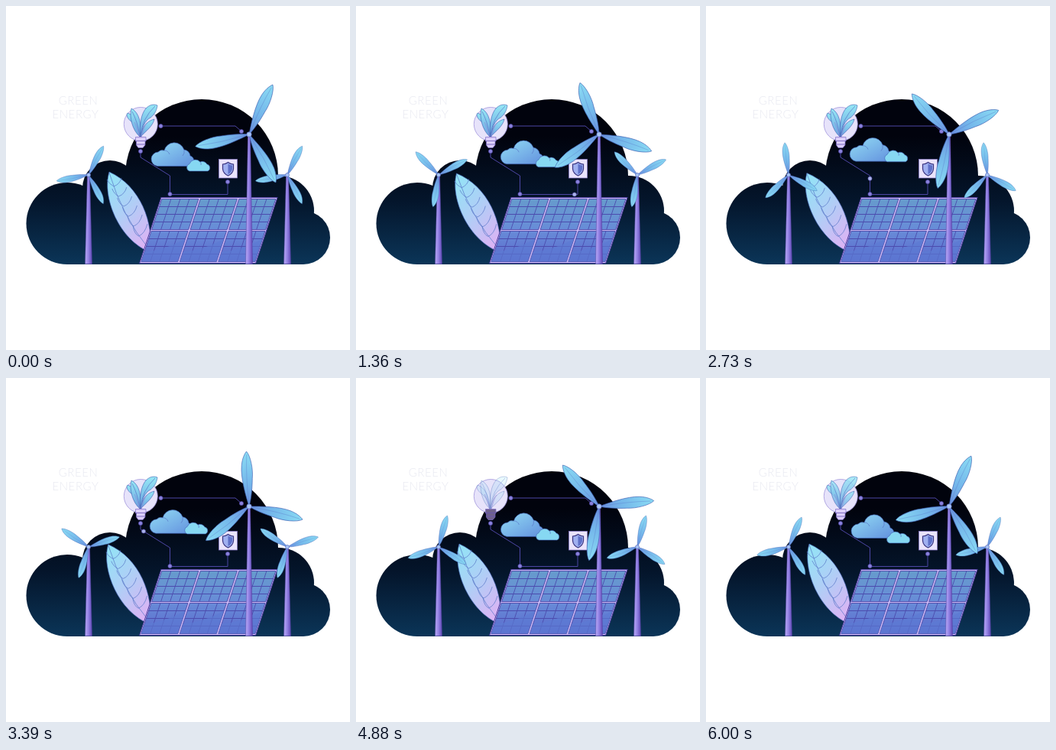
An HTML page for the animation above (6.03 s loop, 450 by 450 pixels).

```html
<!DOCTYPE html>
<html lang="en">
<head>
<meta charset="utf-8">
<title>Green energy</title>
<style>
  html, body { margin: 0; width: 100%; height: 100%; overflow: hidden; background: #fff; }
  svg { display: block; width: 100vw; height: 100vh; }
  text { font: 300 15px Lato, "Open Sans", sans-serif; letter-spacing: .6px; text-anchor: end; fill: #e8e9f1; }
  .wire { fill: none; stroke: #4d46a4; stroke-width: 1; }
  .dot { fill: #8a82dc; stroke: #4a40a0; stroke-width: .6; }
  .edge { stroke: #3c5cb0; stroke-width: .6; }
  .vein { fill: none; stroke: #5a78c8; stroke-width: .7; }
</style>
</head>
<body>
<svg viewBox="0 0 450 450">
  <defs>
    <linearGradient id="night" gradientUnits="userSpaceOnUse" x1="0" y1="170" x2="0" y2="338">
      <stop stop-color="#01030d"/><stop offset=".5" stop-color="#04152b"/><stop offset="1" stop-color="#0b3558"/>
    </linearGradient>
    <linearGradient id="pole"><stop stop-color="#b8aaf6"/><stop offset=".5" stop-color="#9280e4"/><stop offset="1" stop-color="#5f48b4"/></linearGradient>
    <linearGradient id="wing" x1="0" y1="0" x2="0" y2="1"><stop stop-color="#8adcf4"/><stop offset=".6" stop-color="#74b6ea"/><stop offset="1" stop-color="#6c90e0"/></linearGradient>
    <linearGradient id="leafFill" x1=".1" y1="0" x2=".7" y2="1"><stop stop-color="#92e4f6"/><stop offset=".5" stop-color="#b0cef6"/><stop offset="1" stop-color="#dab4f4"/></linearGradient>
    <linearGradient id="sky" x1="0" y1="0" x2="1" y2="1"><stop stop-color="#92dcf4"/><stop offset="1" stop-color="#6290de"/></linearGradient>
    <linearGradient id="sprout" x1="0" y1="0" x2="0" y2="1"><stop stop-color="#96e8f5"/><stop offset="1" stop-color="#6aa2e0"/></linearGradient>
    <linearGradient id="solar" gradientUnits="userSpaceOnUse" x1="0" y1="0" x2="0" y2="86">
      <stop stop-color="#669ccc"/><stop offset=".5" stop-color="#688cd8"/><stop offset="1" stop-color="#5a68cc"/>
    </linearGradient>
    <g id="blade">
      <path class="edge" fill="url(#wing)" d="M0 0C-3-12-9-38-6.500-54C-5-64-1-70 1-72C6-66 8.500-48 6.500-36C5.500-22 3-8 0 0Z"/>
      <path class="vein" d="M0-5Q-2-38 1-68" opacity=".5"/>
    </g>
    <g id="rotor">
      <use href="#blade"/>
      <use href="#blade" transform="rotate(106.5)"/>
      <use href="#blade" transform="rotate(234.5)"/>
    </g>
  </defs>

  <text x="120.500" y="129">GREEN</text>
  <text x="121.500" y="147">ENERGY</text>

  <g fill="url(#night)">
    <circle cx="80" cy="284.500" r="53.500"/>
    <circle cx="136" cy="238" r="36"/>
    <circle cx="256" cy="222" r="100"/>
    <circle cx="357" cy="268" r="46"/>
    <circle cx="389" cy="303" r="35"/>
    <path d="M104 240H364V284H389V338H80V284H104Z"/>
  </g>

  <path class="wire" d="M202 157H300L308 164"/>
  <path class="wire" id="feed" d="M290 230V246.500H214.500V222L176 198V190"/>
  <g id="dots"></g>

  <g id="bigCloud">
    <path class="edge" fill="url(#sky)" d="M198 209.500a9.300 9.300 0 0 1 1-18.500a8 8 0 0 1 8-2a13.600 13.600 0 0 1 26-1a9 9 0 0 1 8 8a7 7 0 0 1-1 13.500Z"/>
    <path class="vein" d="M207 189q5 0 7 5M233 188q1 5-2 8"/>
  </g>
  <g id="smallCloud">
    <path class="edge" fill="#86d8f2" d="M240 216a5 5 0 0 1 0-9.500a8.200 8.200 0 0 1 14-2.500a7 7 0 0 1 9 3a4.800 4.800 0 0 1 1 9Z"/>
    <path class="vein" d="M254 204q2 2 1 4"/>
  </g>

  <g id="socket">
    <rect x="278.500" y="200.500" width="24" height="24.500" fill="#eae4fb" stroke="#8c7ccc" stroke-width=".7"/>
    <path d="M290.500 204.500Q294 207 297.500 207V213Q297 219 290.500 222Q284 219 283.500 213V207Q287 207 290.500 204.500Z" fill="#9fb0f0" stroke="#39347e" stroke-width="1.2"/>
    <path d="M290.500 206.500Q293.500 208.500 296 208.500V213Q295.500 217.500 290.500 220Z" fill="#5f70c8"/>
  </g>

  <g>
    <circle cx="176.300" cy="154.500" r="22" fill="#e7e3fa" stroke="#a195dc" stroke-width=".8"/>
    <g id="sprouts" class="edge" fill="url(#sprout)">
      <path d="M175 171C173 162 171 157 165 152C158 147 157 142 159 140C168 143 174 153 175 171Z"/>
      <path d="M175 171C165 162 161 145 164 134C174 139 178 154 175 171Z"/>
      <path d="M176 171C174 155 177 141 183 134C188 129 193 128 198 130C197 138 193 143 189 146C181 150 178 160 176 171Z"/>
      <path d="M176 171C178 159 183 151 194 148C192 157 184 163 176 171Z"/>
      <path class="vein" d="M175 170Q172 151 165 138M176 170Q178 147 195 131"/>
    </g>
    <path d="M175 172Q171 157 168 152M177 172Q180 158 184 153" fill="none" stroke="#8f80d4" stroke-width=".6"/>
    <path id="cap" d="M169.500 171.500H183V177H182V182L179 185.500H173L170.500 182V177H169.500Z" fill="#dccffa" stroke="#7d6ac4" stroke-width=".7"/>
    <path d="M170 176.500H183M171 181H182" stroke="#6855b4" stroke-width=".8"/>
  </g>

  <g id="leaf">
    <path class="edge" fill="url(#leafFill)" d="M135 217C125 250 148 306 188 322C194 285 176 235 135 217Z"/>
    <path class="vein" d="M135 218Q152 275 187 318"/>
    <path id="veins" class="vein"/>
  </g>

  <g id="panel" transform="matrix(1 0 -.33 1 203 250.500)"></g>
  <g id="turbines"></g>
</svg>
<script>
const LOOP = 6030;
const $ = id => document.getElementById(id);
const clamp = x => Math.min(1, Math.max(0, x));
const smooth = x => (x = clamp(x), x * x * (3 - 2 * x));

$('dots').innerHTML = [[202.5, 157], [308, 164], [176, 190], [214.500, 246], [290, 230]]
  .map(([x, y]) => `<circle class="dot" cx="${x}" cy="${y}" r="2.600"/>`).join('') +
  '<circle id="spark" class="dot" r="2.600" style="fill:#aab4e8"/>';

let veins = '';
for (let i = 0; i < 6; i++) {
  const x = 141 + i * 6.5, y = 236 + i * 13;
  veins += `M${x} ${y}q-6-3 ${-9 + i * .3} ${-9 - i}M${x} ${y}q8-3 ${10 + i * .3} ${-11 - i}`;
}
$('veins').setAttribute('d', veins);

let panel = '<path d="M0 0H152V86H0Z" fill="#cdbcf6" stroke="#4a3c9c"/>';
for (let row = 0; row < 2; row++) for (let col = 0; col < 3; col++) {
  const x = 1.5 + col * 50.5, y = 2 + row * 42, w = 48, h = 40;
  let grid = '';
  for (let i = 1; i < 4; i++) grid += `M${x + i * w / 4} ${y}v${h}M${x} ${y + i * h / 4}h${w}`;
  panel += `<rect x="${x}" y="${y}" width="${w}" height="${h}" fill="url(#solar)" stroke="#4a44a4" stroke-width=".8"/>
    <path d="${grid}" stroke="#4c4cae" stroke-width=".9"/>`;
  if (row) panel += `<path d="M${x} ${y + 27}Q${x + 26} ${y + 25} ${x + w} ${y + 10}V${y + h}H${x}Z" fill="#5c7cd4" opacity=".65"/>`;
}
$('panel').innerHTML = panel;

const turbines = [
  { x: 108, y: 221, size: .59, turns: 2 },
  { x: 368, y: 221, size: .59, turns: 2 },
  { x: 318, y: 168, size: 1, turns: 1 }
];
$('turbines').innerHTML = turbines.map(({ x, y, size }) => `
  <path d="M${x - 1.5} ${y}h3L${x + 4.500} 337.500h-9Z" fill="url(#pole)" stroke="#5442a0" stroke-width=".5"/>
  <g transform="translate(${x} ${y})">
    <use class="rotor" href="#rotor"/>
    <circle r="${1.5 + 1.7 * size}" fill="#a8c4f4" stroke="#5a6cc0" stroke-width=".7"/>
  </g>`).join('');
const rotors = document.querySelectorAll('.rotor');
const feed = $('feed'), feedLength = feed.getTotalLength();

function draw(now) {
  const t = now % LOOP, phase = t / LOOP;
  turbines.forEach(({ size, turns }, i) => {
    const lag = size === 1 ? -2 * Math.cos(2 * Math.PI * (t - 300) / LOOP) : 0;
    const angle = 152 + 360 * turns * phase + lag;
    rotors[i].setAttribute('transform', `rotate(${angle}) scale(${size})`);
  });

  const lift = (1 - Math.cos(2 * Math.PI * phase)) / 2;
  $('bigCloud').setAttribute('transform', `translate(${-2 * lift} ${-6.5 * lift})`);
  $('smallCloud').setAttribute('transform', `translate(${-3 * lift} ${-12.5 * lift})`);

  const sway = -2.2 * Math.sin(Math.PI * clamp(t / 3800));
  $('leaf').setAttribute('transform', `rotate(${sway} 188 321)`);

  const trip = (t - 1053) / 2527;
  const p = feed.getPointAtLength(feedLength * clamp(trip));
  $('spark').setAttribute('transform', `translate(${p.x} ${p.y})`);
  $('spark').style.opacity = trip > 0 && trip < 1 ? 1 : 0;

  // The sprouts dim while the bulb flickers, then fill in again.
  const dim = smooth((t - 4300) / 500) * (1 - .75 * smooth((t - 4900) / 1130));
  $('sprouts').style.fillOpacity = 1 - .8 * dim;
  $('sprouts').style.strokeOpacity = 1 - .5 * dim;
  const shade = dim > .7 ? (dim - .7) / .3 : 0;
  $('cap').style.fill = `rgb(${220 - 110 * shade},${207 - 110 * shade},${250 - 110 * shade})`;
}

const start = performance.now();
function tick() {
  draw(performance.now() - start);
  requestAnimationFrame(tick);
}
tick();
</script>
</body>
</html>
```
